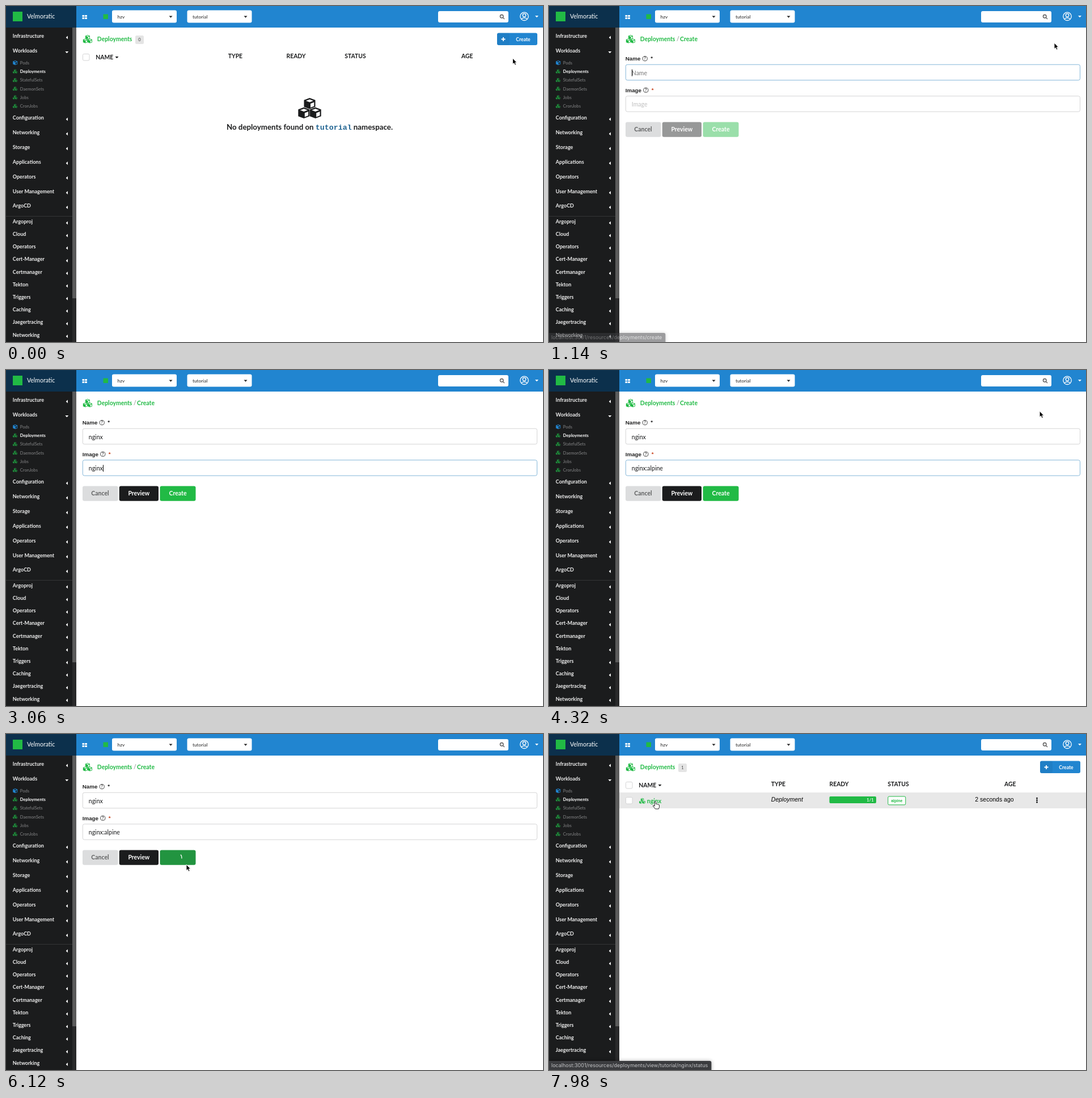
Recreate the animation shown at these times as an HTML page. Size 947x592 px, loop 8000 ms.

```html
<!DOCTYPE html>
<html lang="en">
<head>
<meta charset="utf-8">
<title>Creating a deployment</title>
<style>
  html, body { margin: 0; width: 100%; height: 100%; overflow: hidden; background: #fff; }
  svg { display: block; width: 100%; height: 100%; font: 10.5px Lato, sans-serif; }
  text { white-space: pre; }
  .bold { font-weight: 700; }
  .arial { font-family: "Liberation Sans", Arial, sans-serif; }
  .white { fill: #fff; }
  .green { fill: #21ba45; }
  .mid { text-anchor: middle; }
  .section { font-size: 9px; font-weight: 700; fill: #f0f0f0; }
  .sub { font-size: 7.6px; fill: #858687; }
  .sub.active { fill: #fff; font-weight: 700; }
  .box { fill: #fff; stroke: #d4d4d5; }
  .bubble { font: 9px Inter, sans-serif; fill: #c4c5c7; }
</style>
</head>
<body>
<svg viewBox="0 0 947 592">
  <defs>
    <path id="cube" fill-rule="evenodd" d="M0-9.8L10-6V6L0 9.8L-10 6V-6ZM0-7.4L6.6-4.8L0-2.2L-6.6-4.8ZM1.5.3L7.8-2.3V4.6L1.5 7.2Z"/>
    <g id="cubes">
      <use href="#cube" x="20.5" y="9.8"/>
      <use href="#cube" x="10.3" y="26.3"/>
      <use href="#cube" x="30.7" y="26.3"/>
    </g>
    <path id="down" d="M-3-1.5H3L0 1.8Z"/>
    <path id="left" d="M1.6-3V3L-1.6 0Z"/>
    <g id="help">
      <circle r="4.1" fill="none" stroke="#333" stroke-width=".9"/>
      <text class="mid bold" y="2.5" font-size="7" fill="#333">?</text>
    </g>
  </defs>

  <rect width="947" height="592" fill="#fff"/>
  <rect x="124" width="823" height="38" fill="#2185d0"/>
  <rect width="124" height="592" fill="#1b1c1d"/>
  <rect width="124" height="38" fill="#0c304c"/>
  <rect x="117" y="38" width="7" height="554" fill="#29292a"/>
  <rect x="117" y="38" width="7" height="477" fill="#5b5b5b"/>
  <path d="M0 370.5H117" stroke="#343536"/>
  <rect class="green" x="12" y="10" width="17" height="17"/>
  <text class="white" x="37" y="22.3">Velmoratic</text>
  <g id="menu"></g>

  <path class="white" d="M134.5 16h3.7v3h-3.7zM139.2 16h3.7v3h-3.7zM134.5 20h3.7v3h-3.7zM139.2 20h3.7v3h-3.7z"/>
  <rect class="green" x="171.5" y="14.5" width="8.5" height="8.5"/>
  <g class="white">
    <rect x="187" y="7.5" width="114" height="22" rx="3"/>
    <rect x="319.5" y="7.5" width="114" height="22" rx="3"/>
    <rect x="762" y="9" width="124" height="20" rx="3"/>
    <use href="#down" x="936" y="18.5"/>
  </g>
  <g font-size="8.3" fill="#222">
    <text x="196.5" y="22">hzv</text>
    <text x="329" y="22">tutorial</text>
    <use href="#down" x="290.5" y="19"/>
    <use href="#down" x="422.5" y="19"/>
  </g>
  <g fill="none" stroke="#555" stroke-width="1.3">
    <circle cx="874.2" cy="18.3" r="2.8"/><path d="M876.3 20.4L879 23"/>
  </g>
  <g fill="none" stroke="#fff" stroke-width="1.3">
    <circle cx="914" cy="18.3" r="7.2"/><circle cx="914" cy="16.3" r="2.8"/>
    <path d="M909 23.4Q910 20.8 914 20.8T919 23.4"/>
  </g>
  <use class="green" href="#cubes" transform="translate(135.7 51) scale(.4)"/>
  <text class="bold green" x="160.8" y="62" font-size="10.4">Deployments</text>

  <g id="list">
    <rect x="228" y="52" width="15" height="15" rx="2.5" fill="#e4e4e4"/>
    <text id="count" class="mid" x="235.5" y="62.3" font-size="7.5" fill="#444"></text>
    <rect id="newButton" x="866" y="47.5" width="71" height="21.5" rx="3"/>
    <rect x="866" y="47.5" width="22" height="21.5" rx="3" fill="#000" opacity=".05"/>
    <path d="M873.5 58.5H880.5M877 55V62" stroke="#fff" stroke-width="1.8"/>
    <text class="bold white mid" x="912" y="61.5" font-size="8.6">Create</text>
    <g class="bold" font-size="10.4" fill="#1b1c1d">
      <text x="158.3" y="94">NAME</text><use href="#down" x="195.5" y="90.5"/>
      <text x="391.7" y="91.7">TYPE</text><text x="494.5" y="91.7">READY</text>
      <text x="597.3" y="91.7">STATUS</text><text x="803" y="91.7">AGE</text>
    </g>
    <rect class="box" x="135.5" y="84.5" width="11.5" height="11.5" rx="2"/>
    <g id="empty" fill="#1b1c1d">
      <use href="#cubes" x="515" y="162"/>
      <text class="mid bold" x="535.5" y="218" font-size="13.3">No deployments found on <tspan font-family="Liberation Mono, monospace" fill="#1f6391">tutorial</tspan> namespace.</text>
    </g>
    <g id="row">
      <rect id="rowHover" x="124" y="103" width="823" height="28" fill="#e8e8e8"/>
      <rect class="box" x="135.5" y="111.5" width="11.5" height="11.5" rx="2"/>
      <use class="green" href="#cubes" transform="translate(159 113) scale(.27)"/>
      <text class="bold green" x="172.8" y="121.5">nginx</text>
      <text class="arial" x="391.8" y="119.3" font-style="italic">Deployment</text>
      <rect class="green" x="494.5" y="110" width="82.5" height="12" rx="2"/>
      <text class="bold" x="572.5" y="118.6" font-size="7.5" text-anchor="end" fill="#e6f7ea">1/1</text>
      <rect x="597.8" y="110" width="31" height="14.8" rx="2" fill="#fff" stroke="#21ba45"/>
      <text class="arial bold green mid" x="613.3" y="119.8" font-size="7">alpine</text>
      <text class="arial" x="751.3" y="119.3">2 seconds ago</text>
      <path d="M860.5 113.3v0M860.5 116.8v0M860.5 120.3v0" stroke="#1b1c1d" stroke-width="2.9" stroke-linecap="round"/>
    </g>
  </g>

  <g id="form">
    <text x="225" y="62" fill="#888">/</text>
    <text class="bold green" x="231" y="62">Create</text>
    <g class="arial bold" font-size="9.75" fill="#222">
      <text x="134.8" y="96.3">Name</text><text x="134.8" y="151.8">Image</text>
      <text x="179.3" y="95">*</text><text x="180.8" y="150.5" fill="#c8421c">*</text>
    </g>
    <use href="#help" x="169.2" y="92.7"/><use href="#help" x="170.8" y="148.2"/>
    <g id="fields"></g>
    <path id="caret" stroke="#000"/>
    <rect x="135" y="204.5" width="62.5" height="26.3" rx="3" fill="#dcddde"/>
    <text class="bold mid" x="166" y="221.3" fill="#5f6061">Cancel</text>
    <g id="actions">
      <rect x="199.7" y="204.5" width="69.3" height="26.3" rx="3" fill="#1b1c1d"/>
      <text class="bold mid white" x="234.3" y="221.3">Preview</text>
      <rect id="submit" x="271.5" y="204.5" width="63" height="26.3" rx="3"/>
      <text id="submitText" class="bold mid white" x="303" y="221.3">Create</text>
    </g>
    <path id="spinner" d="M5.3-4.5A7 7 0 0 1 6.9 1.3" fill="none" stroke="#fff" stroke-width="1.4" stroke-linecap="round"/>
  </g>

  <g id="status">
    <rect id="statusBox" x="-4" y="576" height="20" rx="3" fill="#3b3c3f" style="filter:drop-shadow(0 0 3px #0005)"/>
    <text id="statusText" class="bubble" x="4" y="587.3"></text>
  </g>

  <g id="pointer" stroke="#fff" stroke-width=".9" stroke-linejoin="round">
    <path id="arrow" d="M0 0V10.6L2.4 8.4L4.2 12.2L6.1 11.3L4.4 7.7H7.5Z"/>
    <path id="hand" fill="#fff" stroke="#111" d="M-1.2.8Q0-.8 1.2.8V5Q2.5 4.2 3.3 5.4Q4.6 4.8 5.3 6Q7 5.6 7 7.2V10Q6.6 12 5.8 13.5H0Q-1.5 11.5-4 8.6Q-4.2 7-2.4 7.6L-1.2 8.6Z"/>
  </g>
</svg>
<script>
const LOOP = 8000, STEP = 60;
const T = { opened: 840, typeName: 1400, focusImage: 2140, typeImage: 2500,
            wake: 4170, click: 5980, listed: 6420, link: 7500 };
const el = Object.fromEntries([...document.querySelectorAll("[id]")].map(n => [n.id, n]));
const clamp = v => Math.min(1, Math.max(0, v));
const ramp = (t, start, length) => clamp((t - start) / length);
const mix = (a, b, p) => a + (b - a) * p;
const show = (node, on) => { node.style.display = on ? "" : "none"; };
const grey = v => `rgb(${v},${v},${v})`;

function buildMenu() {
  const main = ["Configuration", "Networking", "Storage", "Applications", "Operators", "User Management", "ArgoCD"];
  const extra = ["Argoproj", "Cloud", "Operators", "Cert-Manager", "Certmanager", "Tekton", "Triggers",
                 "Caching", "Jaegertracing", "Networking"];
  const subs = ["Pods", "Deployments", "StatefulSets", "DaemonSets", "Jobs", "CronJobs"];
  const section = (name, y, arrow = "left") =>
    `<text class="section" x="11.8" y="${y + 3}">${name}</text><use class="white" href="#${arrow}" x="107.3" y="${y + 2.4}"/>`;
  const icon = (i, y) => i
    ? `<use href="#cubes" fill="#1f9a3f" transform="translate(12 ${y - 3.7}) scale(.2)"/>`
    : `<use href="#cube" fill="#2185d0" transform="translate(16.2 ${y}) scale(.4)"/>`;
  el.menu.innerHTML = section("Infrastructure", 53) + section("Workloads", 79, "down")
    + subs.map((name, i) => {
        const y = 100 + i * 15.25;
        return icon(i, y) + `<text class="sub${i === 1 ? " active" : ""}" x="24.8" y="${y + 2.8}">${name}</text>`;
      }).join("")
    + main.map((name, i) => section(name, 197 + i * 25.9)).join("")
    + extra.map((name, i) => section(name, 379.8 + i * 22.2)).join("");
}

function makeField(placeholder, y, value, start, gap) {
  const group = document.createElementNS("http://www.w3.org/2000/svg", "g");
  group.innerHTML = `<rect class="box" x="135.3" y="${y}" width="801.2" height="27.5" rx="3"/><text x="145.8" y="${y + 18.3}"></text>`;
  el.fields.append(group);
  const [box, text] = group.children;
  return { placeholder, y, value, start, gap, box, text };
}

function drawField(field, t, focus, focused) {
  const typed = t < field.start ? 0 : Math.min(field.value.length, Math.floor((t - field.start) / field.gap) + 1);
  field.text.textContent = typed ? field.value.slice(0, typed) : field.placeholder;
  field.text.style.fill = typed ? "#1b1c1d" : grey(mix(191, 120, focus));
  field.box.style.stroke = `rgb(${mix(212, 133, focus)},${mix(212, 183, focus)},${mix(213, 217, focus)})`;
  if (!focused) return;
  const lastKey = typed ? field.start + (typed - 1) * field.gap : focused;
  const x = 146.5 + (typed ? field.text.getComputedTextLength() : 0);
  el.caret.setAttribute("d", `M${x} ${field.y + 8.5}v12`);
  show(el.caret, (t - lastKey) % 1000 < 500);
}

// Each move: start, end, target x, target y
const moves = [[60, 480, 891, 65], [T.wake, 5340, 318, 230], [6480, 7020, 285.5, 218], [7080, 7620, 187.5, 118.5]];
function pointerAt(t) {
  let x = 893.5, y = 92;
  for (const [start, end, toX, toY] of moves) {
    const p = ramp(t, start, end - start), s = p * p * (3 - 2 * p);
    x = mix(x, toX, s);
    y = mix(y, toY, s);
  }
  return [x, y];
}

function drawStatus(path, opacity) {
  el.status.style.opacity = opacity;
  el.statusText.textContent = "localhost:3001/resources/deployments/" + path;
  el.statusBox.setAttribute("width", el.statusText.getComputedTextLength() + 14);
}

buildMenu();
const nameField = makeField("Name", 103.2, "nginx", T.typeName, 110);
const imageField = makeField("Image", 158.7, "nginx:alpine", T.typeImage, 115);

function draw(t) {
  const [x, y] = pointerAt(t);
  const formOpen = t >= T.opened && t < T.listed, created = t >= T.listed;
  const loading = t >= T.click;
  const onNew = t < T.opened && y < 69;
  const onSubmit = formOpen && !loading && x < 334 && y < 231;
  const onLink = created && x < 199 && y < 131;

  show(el.form, formOpen);
  show(el.list, !formOpen);
  show(el.empty, !created);
  show(el.row, created);
  show(el.rowHover, created && y < 131);
  el.count.textContent = created ? 1 : 0;
  el.newButton.style.fill = onNew ? "#1678c2" : "#2185d0";

  if (formOpen) {
    show(el.caret, false);
    const swap = ramp(t, T.focusImage + 20, 100);
    const onImage = t >= T.focusImage && !loading;
    drawField(nameField, t, 1 - swap, t < T.focusImage && T.opened);
    drawField(imageField, t, loading ? 0 : swap, onImage && T.focusImage);
    el.actions.style.opacity = mix(.45, 1, ramp(t, T.typeImage, 100));
    el.submit.style.fill = loading ? "#229440" : onSubmit ? "#16ab39" : "#21ba45";
    show(el.submitText, !loading);
    show(el.spinner, loading);
    el.spinner.setAttribute("transform", `translate(303 217.5) rotate(${(t - 6120) * .6})`);
  }

  if (t < 4000) drawStatus("create", ramp(t, 440, 120) * (1 - ramp(t, 1040, 200)));
  else drawStatus("view/tutorial/nginx/status", ramp(t, T.link + 100, 120));

  const hand = onNew || onSubmit || onLink;
  show(el.pointer, t < T.typeName || t >= T.wake);
  show(el.hand, hand);
  show(el.arrow, !hand);
  el.pointer.setAttribute("transform", `translate(${x} ${y})`);
}

function tick() {
  const t = performance.now() % LOOP;
  draw(Math.floor(t / STEP) * STEP);
  requestAnimationFrame(tick);
}
tick();
</script>
</body>
</html>
```
